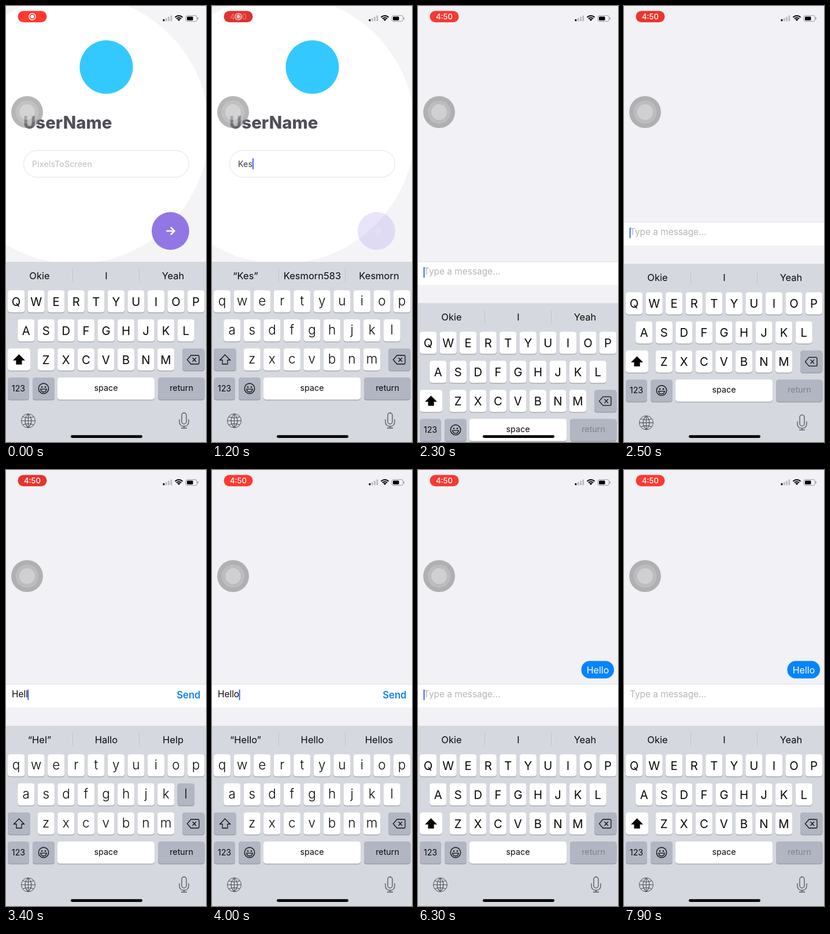
Recreate the animation shown at these times as an HTML page with a canvas. Size 346x750 px, loop 8000 ms.

```html
<!DOCTYPE html>
<html lang="en">
<head>
<meta charset="utf-8">
<title>Chat sign-in</title>
<style>
html, body { margin: 0; width: 100%; height: 100%; overflow: hidden; background: #f2f1f5; }
canvas { display: block; }
</style>
</head>
<body>
<canvas id="stage" width="346" height="750"></canvas>
<script>
const W = 346, H = 750, LOOP = 8000;
const PUSH = 1230, RAISE = 2150, SENT = 4100;
const BG = '#f2f1f5', BLACK = '#090909';
const c = document.getElementById('stage').getContext('2d');

const nameKeys = [[350, 'K'], [600, 'e'], [850, 's']];
const chatKeys = [[2850, 'H'], [3030, 'e'], [3200, 'l'], [3340, 'l'], [3600, 'o']];
const idleHints = ['Okie', 'I', 'Yeah'];
const chatHints = [
  idleHints,
  ['“H”', 'Hey', 'Hi'],
  ['“He”', 'Her', 'Hey'],
  ['“Hel”', 'Hello', 'Help'],
  ['“Hel”', 'Hallo', 'Help'],
  ['“Hello”', 'Hello', 'Hellos']
];

const clamp = v => Math.max(0, Math.min(1, v));
const ramp = (t, from, to) => clamp((t - from) / (to - from));
// Distance left in a critically damped spring, from 1 to 0.
const spring = (ms, rate) => ms <= 0 ? 1 : (1 + rate * ms) * Math.exp(-rate * ms);
const typed = (keys, t) => keys.filter(k => k[0] <= t).map(k => k[1]).join('');

function box(x, y, w, h, r, fill, stroke) {
  c.beginPath();
  c.roundRect(x, y, w, h, r);
  paint(fill, stroke);
}
function disc(x, y, r, fill, stroke) {
  c.beginPath();
  c.arc(x, y, r, 0, 7);
  paint(fill, stroke);
}
function paint(fill, stroke) {
  if (fill) { c.fillStyle = fill; c.fill(); }
  if (stroke) { c.strokeStyle = stroke; c.stroke(); }
}
function path(d, fill, stroke, width = 1.3) {
  const p = new Path2D(d);
  c.lineWidth = width;
  if (fill) { c.fillStyle = fill; c.fill(p); }
  if (stroke) { c.strokeStyle = stroke; c.stroke(p); }
  c.lineWidth = 1;
}
function text(s, x, y, size, color, weight = 400, align = 'left') {
  c.font = `${weight} ${size}px Inter, "Open Sans", sans-serif`;
  c.textAlign = align;
  c.fillStyle = color;
  c.fillText(s, x, y);
  return c.measureText(s).width;
}
function at(x, y, draw, alpha = 1) {
  c.save();
  c.translate(x, y);
  c.globalAlpha *= alpha;
  draw();
  c.restore();
}

function nameScreen(t) {
  c.fillStyle = '#f4f4f7';
  c.fillRect(0, 0, W, H);
  disc(120, 212.5, 231, '#fff');
  disc(173.5, 105, 46, '#33c9ff');
  text('UserName', 30, 211, 29.4, '#514e5a', 800);
  box(30.5, 248.5, 286, 46, 23, '#fff', '#e2e2e6');
  const value = typed(nameKeys, t);
  if (value) {
    const w = text(value, 45, 276.5, 14.3, '#3c3a44');
    box(45 + w, 262, 2, 19, 1, '#4863e2');
  } else {
    text('PixelsToScreen', 45, 276.5, 14.3, '#c7c7cb', 500);
  }
  at(284.5, 387, () => {
    disc(0, 0, 32.5, '#9277e4');
    path('M-7 0H6M.5-6.3L6.8 0L.5 6.3', null, '#fff', 2.6);
  }, 1 - 0.8 * ramp(t, 1050, 1150));
}

function chatScreen(t, lift, value) {
  c.fillStyle = BG;
  c.fillRect(-5, 0, W + 5, H);
  const y = 680 - 311 * lift;
  c.fillStyle = '#fff';
  c.fillRect(0, y, W, 39.5);
  c.fillStyle = '#e0dfe3';
  c.fillRect(0, y - 1, W, 1);
  let w = 0;
  if (value) {
    w = text(value, 10, y + 22, 15.4, BLACK);
    text('Send', 336.5, y + 24, 16.7, '#0a84f5', 600, 'right');
  } else {
    at(0, 0, () => text('Type a message...', 10, y + 22, 15.4, '#b6b6ba'), 0.2 + 0.8 * ramp(t, 1500, 1700));
  }
  if (t > RAISE && (value || t % 1000 < 600)) box(9.5 + w, y + 8.5, 2, 18.5, 1, '#3f66e0');
  if (t >= SENT) {
    box(282.5, 328.5, 56.5, 30, 14.5, '#0584fe');
    text('Hello', 311, 349.5, 16, '#fff', 400, 'center');
  }
}

function key(x, y, w, fill) {
  box(x, y + 1, w, 38.3, 4.6, '#8b8d93');
  box(x, y, w, 38.3, 4.6, fill);
}

function keyboard(y, upper, hints, pressed, canReturn) {
  const GRAY = '#b1b6c2', pitch = 34.55, side = 29.2;
  at(0, y, () => {
    c.fillStyle = '#d5d8df';
    c.fillRect(0, 0, W, H - 440);
    hints.forEach((h, i) => text(h, 58 + 115.5 * i, 30, 16.5, BLACK, 400, 'center'));
    c.fillStyle = '#c1c4cb';
    c.fillRect(115, 12, 1, 23);
    c.fillRect(230, 12, 1, 23);

    [['qwertyuiop', 3], ['asdfghjkl', 20.2], ['zxcvbnm', 54.6]].forEach(([row, left], r) => {
      [...row].forEach((ch, i) => {
        const x = left + pitch * i, top = 49 + 50 * r;
        key(x, top, side, ch === pressed ? GRAY : '#fff');
        text(upper ? ch.toUpperCase() : ch, x + side / 2, top + (upper ? 27 : 25.5),
          upper ? 20.3 : 22.5, BLACK, upper ? 400 : 300, 'center');
      });
    });

    key(3, 149, 39, upper ? '#fff' : GRAY);
    path('M22.5 160L31.5 169H27V176H18V169H13.5Z', upper ? '#000' : null, '#111');
    key(305, 149, 38.5, GRAY);
    path('M320 161H332Q334 161 334 163V174Q334 176 332 176H320L313.5 168.5ZM322.5 165L329 172M329 165L322.5 172', null, '#111');

    key(3, 199, 37, GRAY);
    text('123', 21.5, 223, 14.3, BLACK, 400, 'center');
    key(46, 199, 38, GRAY);
    at(65, 218, () => {
      c.lineWidth = 1.4;
      disc(0, 0, 8.7, null, '#111');
      disc(-3, -2.5, 1.3, '#111');
      disc(3, -2.5, 1.3, '#111');
      path('M-5.3 1.2H5.3Q4.3 6 0 6T-5.3 1.2Z', null, '#111');
    });
    key(89, 199, 168, '#fff');
    text('space', 173, 222, 14.3, BLACK, 400, 'center');
    key(263, 199, 80.5, GRAY);
    text('return', 303.5, 222, 14.3, canReturn ? BLACK : '#7d828c', 400, 'center');

    at(38.5, 273.5, () => {
      disc(0, 0, 12, null, '#50545b');
      path('M-12 0H12M0-12V12M0-12Q-11 0 0 12M0-12Q11 0 0 12M-9.5-7Q0-3 9.5-7M-9.5 7Q0 3 9.5 7', null, '#50545b', 1.1);
    });
    at(308, 273, () => {
      c.lineWidth = 1.3;
      box(-4, -13, 8, 19, 4, null, '#50545b');
      path('M-8-2V2Q-8 10 0 10T8 2V-2M0 10V13M-5 13H5', null, '#50545b');
    });
  });
}

function statusBar(t, thin) {
  const glow = (1 + Math.cos(t * Math.PI / 1000)) / 2;
  box(20.5, 8.5, 50, 19.5, 9.5, `rgb(${218 + 37 * glow},${50 + 7 * glow},${46 + 3 * glow})`);
  const clock = ramp(t, 1100, 1400);
  at(45.5, 18.3, () => {
    c.lineWidth = 1.4;
    disc(0, 0, 5.6, null, '#fff');
    disc(0, 0, 3.2, '#fff');
  }, 1 - clock);
  at(0, 0, () => text('4:50', 45.5, 23, 13.2, '#fff', 500, 'center'), clock);

  for (let i = 0; i < (thin ? 1 : 4); i++) {
    box(271.5 + 4.3 * i, 22.8 - 2.2 * i, 2.8, 3.4 + 2.2 * i, 0.8, i ? '#bdbcc0' : '#000');
  }
  for (const r of [2.2, 5.7, 9.2]) {
    c.beginPath();
    c.lineWidth = r < 3 ? 3.2 : 2;
    c.arc(299, 26, r, -Math.PI * 0.75, -Math.PI * 0.25);
    paint(null, '#000');
  }
  c.lineWidth = 1;
  if (!thin) {
    box(311, 16.5, 19.5, 10, 3, null, '#98979b');
    box(331.5, 19.5, 1.3, 4, 0.7, '#98979b');
  }
  box(313, 18.3, 10.5, 6.4, 1.4, '#000');
}

function touchButton() {
  disc(36.5, 182.5, 27.5, 'rgba(130,130,132,.58)');
  disc(36.5, 182.5, 20, 'rgba(255,255,255,.15)');
  disc(36.5, 182.5, 13.5, 'rgba(255,255,255,.3)');
}

function draw(t) {
  c.clearRect(0, 0, W, H);
  const onName = t < PUSH;
  const away = spring(t - PUSH, 0.018);
  const lift = 1 - spring(t - RAISE, 0.0186);
  const value = t < SENT ? typed(chatKeys, t) : '';

  if (away > 0.002) at(-104 * (1 - away), 0, () => nameScreen(t));
  if (!onName) at(W * away, 0, () => chatScreen(t, lift, value));

  const keys = onName ? nameKeys : chatKeys;
  const hit = keys.find(k => t >= k[0] && t < k[0] + 110);
  const pressed = hit && hit[1].toLowerCase();
  if (t < RAISE) {
    const name = typed(nameKeys, t);
    const drop = 310 * ramp(t, PUSH, PUSH + 240) ** 1.5;
    const hints = name ? [`“${name}”`, 'Kesmorn583', 'Kesmorn'] : idleHints;
    if (drop < 310) keyboard(440 + drop, !name, hints, pressed, true);
  } else {
    keyboard(750 - 310 * lift, !value, chatHints[value.length], pressed, !!value);
  }

  const thin = t >= 1400 && t < 1600;
  statusBar(t, thin);
  if (!thin) touchButton();
  box(112, 738.3, 124, 4.6, 2.3, '#000');
}

const start = performance.now();
function tick() {
  draw((performance.now() - start) % LOOP);
  requestAnimationFrame(tick);
}
tick();
</script>
</body>
</html>
```
